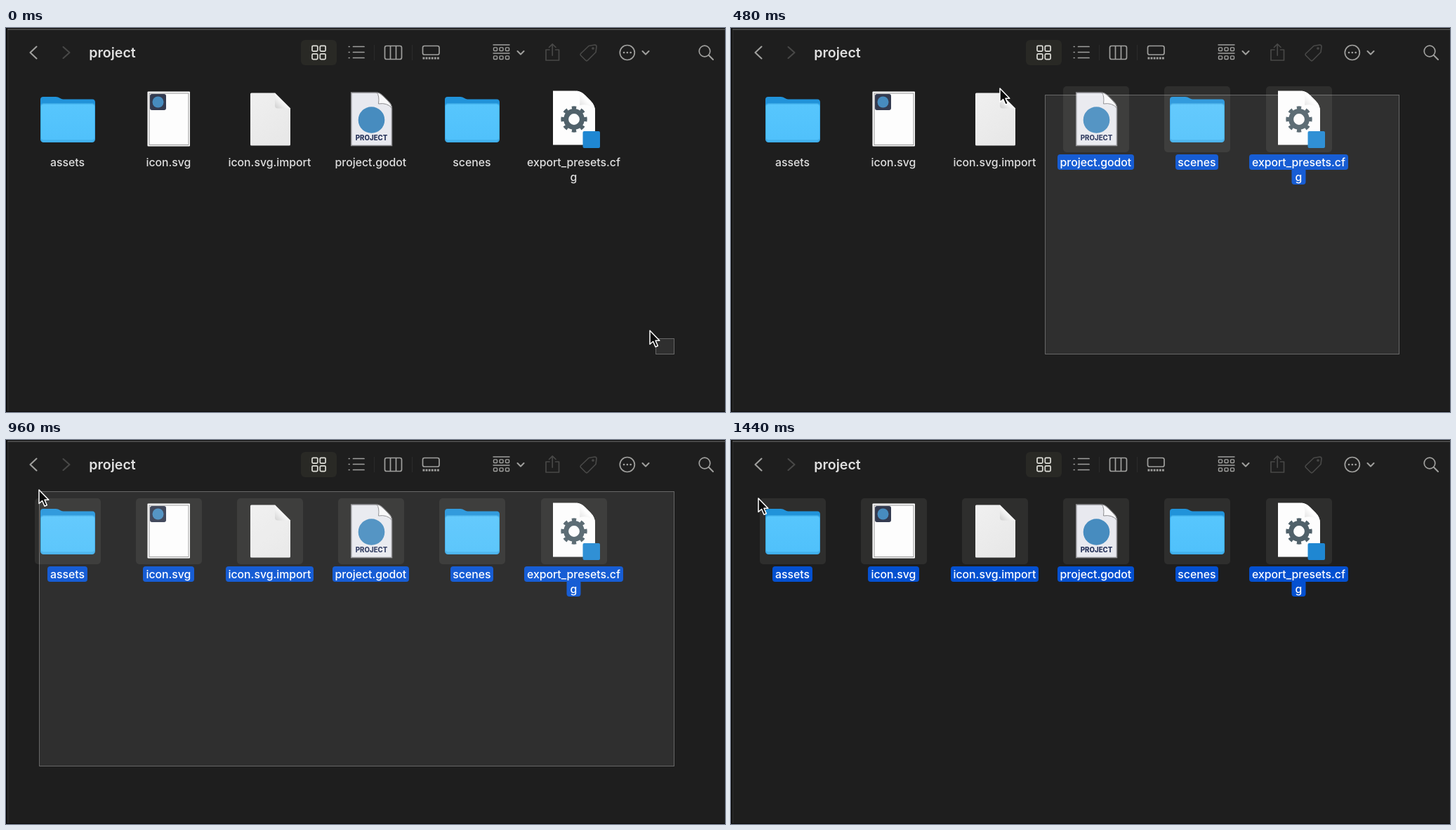
These frames come from a looping animation (1024x547 px, 1520 ms). An HTML page:

```html
<!DOCTYPE html>
<html lang="en">
<head>
<meta charset="utf-8">
<title>File window</title>
<style>
html, body { margin: 0; height: 100%; overflow: hidden; background: #1e1e1e; }
svg { display: block; width: 100vw; height: 100vh; }
text { font-family: Inter, "Open Sans", sans-serif; fill: #e0e0e0; }
.label { font-size: 15.8px; font-weight: 450; text-anchor: middle; }
.on .label { fill: #fff; }
.mark { visibility: hidden; }
.on .mark { visibility: visible; }
.tile { fill: #2e2e2d; }
.pill { fill: #0450d0; }
.bar { fill: none; stroke: #a0a09e; stroke-width: 1.7; stroke-linecap: round; stroke-linejoin: round; }
.dim { stroke: #484847; }
</style>
</head>
<body>
<svg viewBox="0 0 1024 547">
  <defs>
    <linearGradient id="paper" x2=".6" y2="1">
      <stop stop-color="#f0f0f0"/><stop offset="1" stop-color="#e8e8e8"/>
    </linearGradient>
    <linearGradient id="fold" x1="1" y1="0" x2="0" y2="1">
      <stop offset=".45" stop-color="#fff"/><stop offset="1" stop-color="#cfcfcf"/>
    </linearGradient>
    <linearGradient id="front" x2="0" y2="1">
      <stop stop-color="#57c6fd"/><stop offset="1" stop-color="#50c1fb"/>
    </linearGradient>
  </defs>
  <rect width="1024" height="547" fill="#1e1e1e"/>
  <path d="M0 0H1024V1H0Z M0 0H2V547H0Z M0 546H1024V547H0Z" fill="#0c0c0c"/>
  <path d="M2 2H1024" stroke="#545454" stroke-width="1.5"/>
  <path d="M2.5 3V546" stroke="#343434"/>

  <rect x="420" y="17" width="51" height="36" rx="6" fill="#292925"/>
  <path d="M524.5 24V46M578.5 24V46" stroke="#2b2b2b"/>
  <text x="118.2" y="41.5" font-size="19.6" font-weight="600">project</text>
  <g class="bar">
    <path d="M43.5 26.5L34.5 35L43.5 43.5" stroke-width="2.1"/>
    <path class="dim" d="M81.5 27L90.5 35L81.5 43" stroke-width="2.1"/>
    <g id="grid" stroke="#deded8"></g>
    <path d="M494.5 26.5H510M494.5 34.5H510M494.5 42.5H510M488.3 26.5h.8M488.3 34.5h.8M488.3 42.5h.8"/>
    <rect x="539.5" y="25.5" width="24" height="19" rx="2.5"/>
    <path d="M547.5 26V44M555.5 26V44"/>
    <rect x="593.5" y="25.5" width="23.5" height="12.5" rx="2.5"/>
    <path d="M593.5 43H617" stroke-width="3" stroke-dasharray="2.8 1.3" stroke-linecap="butt"/>
    <path d="M694 24H717M694 36H717" stroke-width="1.4"/>
    <g id="group" stroke-width="1.4"></g>
    <path d="M728.5 33L733 37.5L737.5 33M906.5 33L911 37.5L915.5 33" stroke-width="2"/>
    <g class="dim">
      <path d="M774 31H769V46H787.5V31H782.5M778.2 39V23M773.5 27.5L778.2 22.8L783 27.5"/>
      <path d="M830 25.5L838.5 24Q841 24 841 26.5L840 34.5L828.5 46Q827 47.5 825.5 46L818.5 39Q817.5 37.5 818.5 36.5Z"/>
      <circle cx="836" cy="29" r="1"/>
    </g>
    <circle cx="884.8" cy="35" r="10.5"/>
    <path d="M880 35h.1M884.8 35h.1M889.6 35h.1" stroke-width="2.6"/>
    <circle cx="995" cy="33" r="7.8"/>
    <path d="M1000.8 38.8L1007 45" stroke-width="2"/>
  </g>

  <g id="files"></g>
  <rect id="band" fill="#fff" fill-opacity=".075" stroke="#fff" stroke-opacity=".3"/>
  <path id="cursor" d="M0 0V19.5L4.6 15.5L8 23.3L11.3 21.8L8 14.3H13.8Z"
        fill="#0a0a0a" stroke="#fff" stroke-width="1.5" stroke-linejoin="round"/>
</svg>
<script>
const $ = id => document.getElementById(id);
const box = (x, y, w, h, r, extra = '') =>
  `<rect x="${x}" y="${y}" width="${w}" height="${h}" rx="${r}" ${extra}/>`;

for (const x of [436, 447.3])
  for (const y of [25.3, 36.8]) $('grid').innerHTML += box(x, y, 7.8, 7.8, 1.5);
for (const x of [694.5, 703, 711.5])
  for (const y of [27.9, 39.9]) $('group').innerHTML += box(x, y, 5, 4.6, 1);

// Icons are drawn around the centre of their tile.
const folder = `
  <path d="M-39 -10V-28Q-39 -32 -35 -32H-17Q-14 -32 -11 -30L-9 -29Q-7 -28.5 -4 -28.5H35Q39 -28.5 39 -24V-10Z" fill="#2193da"/>
  ${box(-39, -23, 78, 56, 4.5, 'fill="#3aa9e6"')}
  ${box(-38, -21.5, 76, 51, 3.5, 'fill="url(#front)"')}
  <path d="M-37 31H37" stroke="#4ab9f4"/>`;

const picture = `
  ${box(-30.5, -39.5, 60.5, 78, 1, 'fill="#fff"')}
  ${box(-28, -37, 56, 73.5, 0, 'fill="#fdfdfd" stroke="#8a8a8a" stroke-width=".9"')}
  ${box(-27, -36, 23, 23, 3, 'fill="#343b50"')}
  <circle cx="-15.5" cy="-24.5" r="8" fill="#478cbf"/>`;

const page = `
  <path d="M-28 -36Q-28 -37.5 -26.5 -37.5H7L29 -15.5V36Q29 37.5 27.5 37.5H-26.5Q-28 37.5 -28 36Z" fill="url(#paper)"/>
  <path d="M7 -37.5L29 -15.5H11Q7 -15.5 7 -19.5Z" fill="url(#fold)"/>`;

const projectFile = `
  <path d="M-28.3 -38H6Q12 -38 17 -33L24 -26Q29.5 -21 29.5 -15V37.5H-28.3Z" fill="#e8e9ef" stroke="#8b8b8e" stroke-width="1.5"/>
  <path d="M8 -38Q12 -34 10.5 -22Q23 -24 29.5 -16Q29.5 -21 24 -26L17 -33Q12 -38 8 -38Z" fill="#f8f8fa" stroke="#8b8b8e"/>
  <circle cx=".5" cy="1" r="18.8" fill="#478cbf"/>
  <text x=".5" y="30" font-size="9.7" font-weight="800" text-anchor="middle" style="fill:#27335a">PROJECT</text>`;

const config = `
  <path d="M-30 -40.5H2Q10 -40.5 16 -34L23 -27Q30 -20 30 -12V36.5H-30Z" fill="#fdfdfd"/>
  <path d="M3 -40.5Q10 -36 8 -20Q23 -23 30 -12Q30 -20 23 -27L16 -34Q10 -40.5 3 -40.5Z" fill="url(#fold)"/>
  <g fill="none" stroke="#50616a">
    <circle r="11.4" stroke-width="7"/>
    <circle r="16.4" stroke-width="4.6" pathLength="16" stroke-dasharray=".96 1.04" transform="rotate(-10.8)"/>
  </g>
  ${box(12.5, 17, 24.5, 24, 2, 'fill="#1f87d2"')}`;

// icon, label lines, half width of the label's highlight
const files = [
  [folder, ['assets'], 28.5],
  [picture, ['icon.svg'], 36.5],
  [page, ['icon.svg.import'], 62.5],
  [projectFile, ['project.godot'], 54.5],
  [folder, ['scenes'], 30.5],
  [config, ['export_presets.cf', 'g'], 70.5],
];

const centre = i => Math.floor(88 + 144.2 * i);
$('files').innerHTML = files.map(([icon, lines, half], i) => `
  <g transform="translate(${centre(i)} 130)">
    <g class="mark">
      ${box(-47, -47, 94, 94, 5, 'class="tile"')}
      ${box(-.5 - half, 50, 2 * half, 22, 4, 'class="pill"')}
      ${lines[1] ? box(-10.5, 69, 20, 24, 4, 'class="pill"') : ''}
    </g>
    ${icon}
    ${lines.map((s, n) => `<text class="label" x="-.6" y="${66.5 + 21.5 * n}">${s}</text>`).join('')}
  </g>`).join('');
const groups = [...$('files').children];

// step, pointer x and y, how far the selection corner trails behind
const path = [
  [0, 917, 431, 8, 11], [1, 905, 412, 9, 13], [2, 872, 362, 13, 17], [3, 808, 283, 16, 17],
  [4, 720, 200, 17, 14], [5, 560, 128, 42, 13], [6, 383, 86, 64, 9], [7, 246, 73, 32, 4],
  [8, 142, 67, 13, 4], [9, 88, 51, 5, 4], [10, 60, 37, 2, 4], [11, 50, 54, 1, 3],
  [12, 47, 71, 0, 2], [14, 44, 73, 0, 1], [17, 38, 86, 0, 1], [18, 39, 83, 0, 0],
];
const STEP = 80, STEPS = 19, RIGHT = 951.5, BOTTOM = 464.5, TOP = 71;

function pose(step) {
  const j = Math.max(1, path.findIndex(p => p[0] >= step));
  const a = path[j - 1], b = path[j], k = (step - a[0]) / (b[0] - a[0]);
  return a.map((v, n) => Math.round(v + (b[n] - v) * k));
}

function set(el, attrs) {
  for (const name in attrs) el.setAttribute(name, attrs[name]);
}

function draw() {
  const step = Math.floor(performance.now() / STEP) % STEPS;
  const [, x, y, lagX, lagY] = pose(step);
  const left = x + lagX, top = Math.max(TOP, y + lagY);
  set($('cursor'), { transform: `translate(${x} ${y})` });
  set($('band'), {
    x: left + .5, y: top + .5, width: RIGHT - left - .5, height: BOTTOM - top - .5,
    visibility: step < STEPS - 1 ? 'visible' : 'hidden',
  });
  groups.forEach((g, i) => {
    const [, lines, half] = files[i];
    const hit = left < centre(i) + Math.max(47, half) && top < (lines[1] ? 223 : 202);
    g.classList.toggle('on', hit);
  });
  requestAnimationFrame(draw);
}
draw();
</script>
</body>
</html>
```
